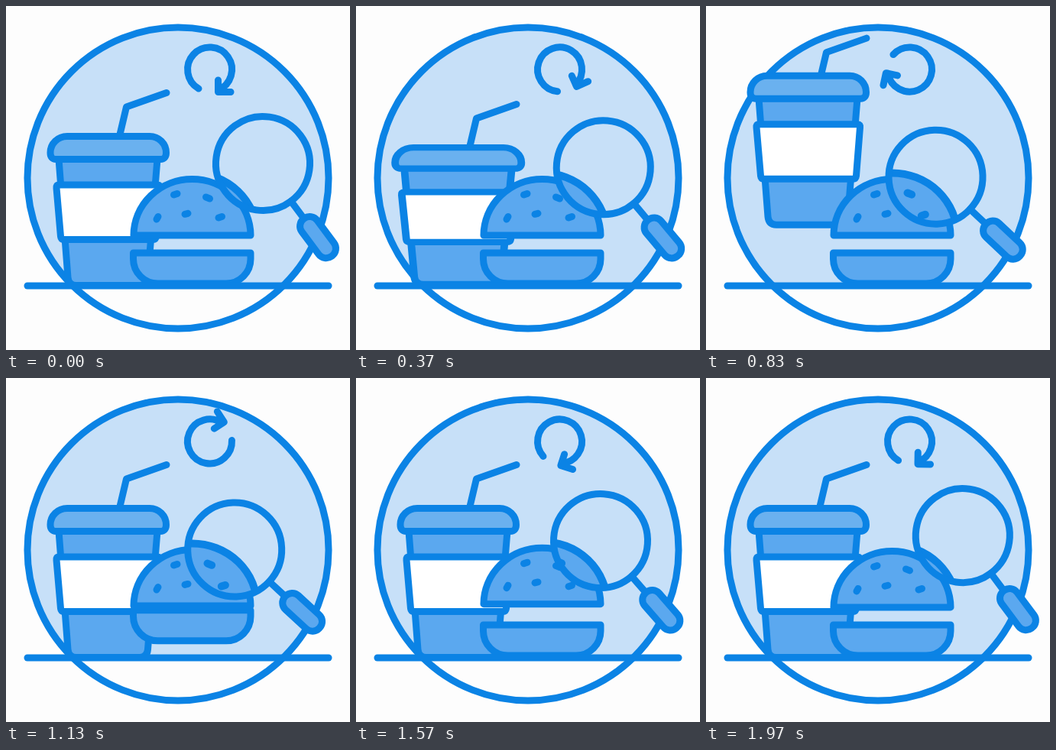
An HTML page that plays this animation: 450 by 450 pixels, repeating every 2010 ms.

```html
<!DOCTYPE html>
<html lang="en">
<head>
<meta charset="utf-8">
<title>Fast food search</title>
<style>
  html, body { margin: 0; width: 100%; height: 100%; overflow: hidden; background: #fdfdfd; }
  svg { display: block; width: 100vw; height: 100vh; }
  .ink { fill: none; stroke: #0b83e5; stroke-width: 9; stroke-linecap: round; stroke-linejoin: round; }
  .mid { fill: #5ba8ef; }
  .lid { fill: #6ab1ef; }
  .light { fill: #c7e0f8; }
  .white { fill: #fff; }
</style>
</head>
<body>
<svg viewBox="0 0 450 450">
  <defs>
    <clipPath id="sky"><rect width="450" height="366"/></clipPath>
    <clipPath id="glass"><circle id="glassHole" cx="336" cy="206" r="61.500"/></clipPath>
    <g id="bun">
      <path class="mid" d="M167 300A76.5 73.5 0 0 1 320 300Z"/>
      <path d="M219.500 247L224 245.500M261.500 250L266.500 252M197 279L199 275.500M234 272.300L238 271.300M278 277L282.500 275.500"/>
    </g>
  </defs>
  <circle class="light" cx="225" cy="225" r="197" clip-path="url(#sky)"/>
  <g class="ink">
    <circle cx="225" cy="225" r="197"/>
    <path id="straw" d="M149 168L157.500 132L210 113.500"/>
    <g id="cup">
      <path class="mid" d="M69 200L81 355Q82 365.500 92 365.500H175Q184.500 365.500 185.500 355L198 200Z"/>
      <path class="white" d="M69 234H198.500Q202 234 201.500 238L196.500 301.500Q196 305.500 192.500 305.500H75.500Q72 305.500 71.500 301.500L66 238Q65.500 234 69 234Z"/>
      <path class="lid" d="M80 170.500H188A21.500 21.500 0 0 1 209.500 192Q209.500 200.500 202 200.500H65.500Q58 200.500 58 192A22 21.500 0 0 1 80 170.500Z"/>
    </g>
    <path id="base" class="mid" d="M166.500 323H320V331A32 32 0 0 1 288 363H198.500A32 32 0 0 1 166.500 331Z"/>
    <use id="top" href="#bun"/>
    <path d="M28 366H422"/>
    <path id="arrow" d="M252 108.100A29 29 0 1 1 277.400 109.900M277.500 97V112.500H294"/>
    <g clip-path="url(#glass)">
      <rect class="light" width="450" height="450" stroke="none"/>
      <use id="zoom" href="#bun"/>
    </g>
    <g id="lens">
      <g transform="translate(336 206) rotate(53.300)">
        <circle r="61.500"/>
        <path d="M61.500 0H90"/>
        <rect class="mid" x="90" y="-12.500" width="61" height="25" rx="12"/>
      </g>
    </g>
  </g>
</svg>
<script>
const LOOP = 2010, STEPS = 60;
const smooth = s => s * s * (3 - 2 * s);
const rise = s => s * (2 - s);
const fall = s => s ** 2.8;

// keys: [time, value, easing used to reach it]
function track(f, ...keys) {
  if (f <= keys[0][0]) return keys[0][1];
  for (let i = 1; i < keys.length; i++) {
    const [t0, a] = keys[i - 1], [t1, b, ease = smooth] = keys[i];
    if (f <= t1) return a + (b - a) * ease((f - t0) / (t1 - t0));
  }
  return keys[keys.length - 1][1];
}

const pose = (id, transform) => document.getElementById(id).setAttribute("transform", transform);

function draw() {
  const f = performance.now() % LOOP / LOOP * STEPS;

  const squash = track(f, [0, 0], [10, 1], [20, 0]);
  const jump = track(f, [11, 0], [20, -91, rise], [30, 0, fall]);
  pose("cup", `translate(134 ${365 + jump}) scale(${1 + .093 * squash} ${1 - .086 * squash}) translate(-134 -365)`);
  pose("straw", `translate(0 ${17 * squash + .9 * jump})`);

  const lift = track(f, [30, 0], [40, -6], [60, 0]);
  pose("top", `translate(0 ${lift})`);
  pose("zoom", `translate(243 ${300 + lift}) scale(1.11) translate(-243 -300)`);
  pose("base", `translate(0 ${track(f, [25, 0], [35, -20], [45, 0])})`);

  pose("arrow", `rotate(${track(f, [0, 0], [10, -25], [50, 385], [60, 360])} 266.5 83)`);

  const tilt = `rotate(${track(f, [0, 0], [30, -11], [60, 0])} 418 415)`;
  pose("lens", tilt);
  pose("glassHole", tilt);

  requestAnimationFrame(draw);
}
draw();
</script>
</body>
</html>
```
